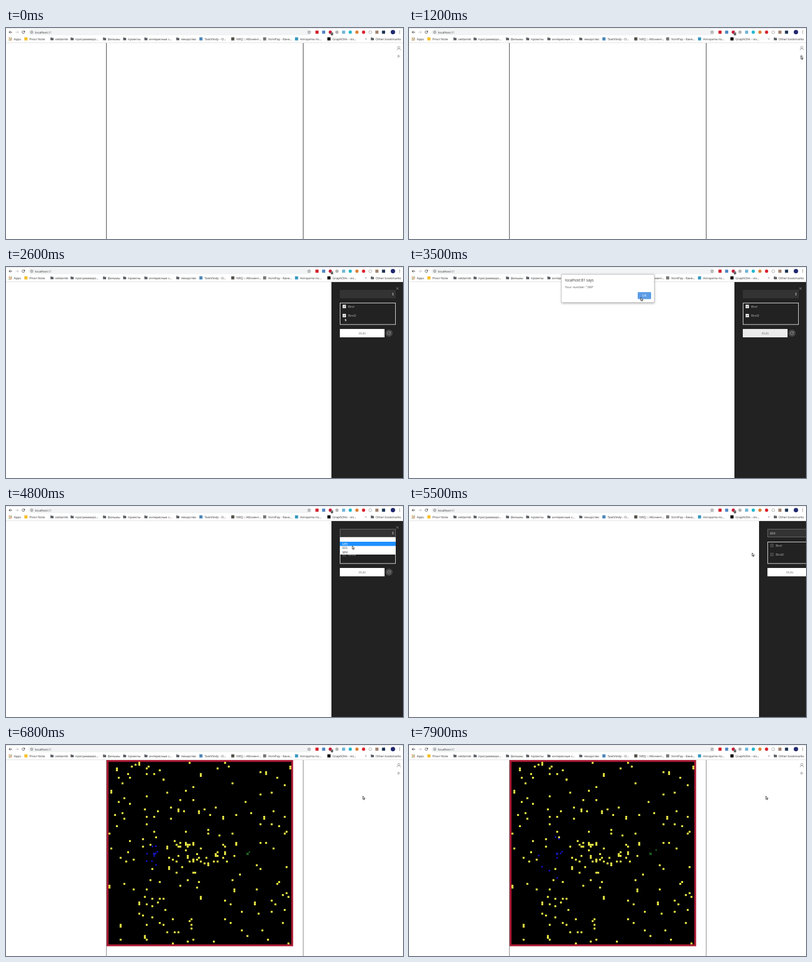
Write an HTML page with a canvas that moves like this. It is 710 px wide and 378 px high and loops after 8 s.

```html
<!DOCTYPE html>
<html lang="en">
<head>
<meta charset="utf-8">
<title>Browser game</title>
<style>
  html, body { margin: 0; width: 100%; height: 100%; overflow: hidden; background: #fff; }
  canvas { display: block; width: 710px; height: 378px; }
</style>
</head>
<body>
<canvas id="stage" width="710" height="378"></canvas>
<script>
const ctx = document.getElementById('stage').getContext('2d');
const UI = '"Open Sans", "Noto Sans", sans-serif';
const FORM = '"Liberation Sans", Arial, sans-serif';
const LOOP = 8000, STEP = 100;

// Moments at which the picture changes hard
const PANEL_OPENS = 1400, FIRST_CHECK = 2200, SECOND_CHECK = 2500, RUN_HOVER = 2700;
const ALERT_OPENS = 3000, ALERT_CLOSES = 4100, SELECT_FOCUS = 4600, LIST_OPENS = 4700;
const LIST_CLOSES = 4900, PANEL_CLOSES = 5443, GAME_STARTS = 5700;

// Timing helpers
const between = (t, from, to) => t >= from && t < to;
const portion = (t, from, to) => Math.min(1, Math.max(0, (t - from) / (to - from)));
const mix = (a, b, u) => a + (b - a) * u;
const easeOut = u => 1 - (1 - u) ** 2;
const smooth = u => u * u * (3 - 2 * u);

// Drawing helpers
function rect(x, y, w, h, color) {
  ctx.fillStyle = color;
  ctx.fillRect(x, y, w, h);
}
function roundRect(x, y, w, h, r, color) {
  ctx.fillStyle = color;
  ctx.beginPath();
  ctx.roundRect(x, y, w, h, r);
  ctx.fill();
}
function frame(x, y, w, h, color, width = 1) {
  ctx.strokeStyle = color;
  ctx.lineWidth = width;
  ctx.strokeRect(x, y, w, h);
}
function disc(x, y, r, color) {
  ctx.fillStyle = color;
  ctx.beginPath();
  ctx.arc(x, y, r, 0, 7);
  ctx.fill();
}
function arc(x, y, r, color, width = 0.8, from = 0, to = Math.PI * 2) {
  ctx.strokeStyle = color;
  ctx.lineWidth = width;
  ctx.beginPath();
  ctx.arc(x, y, r, from, to);
  ctx.stroke();
}
function shape(d, x, y, fill, stroke, width = 0.8) {
  const path = new Path2D(d);
  ctx.save();
  ctx.translate(x, y);
  if (fill) { ctx.fillStyle = fill; ctx.fill(path); }
  if (stroke) { ctx.strokeStyle = stroke; ctx.lineWidth = width; ctx.stroke(path); }
  ctx.restore();
}
function cross(x, y, color, width) {
  shape('M-2-2L2 2M2-2L-2 2', x, y, null, color, width);
}
function text(string, x, y, size, color, font = UI, align = 'left') {
  ctx.font = size + 'px ' + font;
  ctx.fillStyle = color;
  ctx.textAlign = align;
  ctx.fillText(string, x, y);
}

// Browser chrome; a bookmark without a colour is a folder
const bookmarks = [
  [42, 'Pinor Note', '#f5bf28'], [88, 'veldamik'], [124, 'программиро…'],
  [182, 'фильмы'], [218, 'проекты'], [256, 'интересные с…'], [313, 'лекарство'],
  [355, 'TaskVindy - O…', '#4a86b8'], [412, 'NRQ :: Абонент…', '#55524a'],
  [469, 'VornPay - банк…', '#777'], [526, 'Алгоритм по…', '#3698c0'],
  [584, 'GraphOlm - vis…', '#000'], [661, 'Other bookmarks']
];
const extensions = [
  'square #d3202c', 'square #5085c4', 'disc #c8213c', 'disc #b4b4b4', 'square #70b6d6',
  'disc #24b7cb', 'disc #dc8237', 'disc #d8232d', 'ring #999', 'square #a18372', 'square #1d3552'
];

function drawToolbar() {
  rect(0, 0, 710, 1, '#dfe1e5');
  roundRect(40, 2, 507, 11, 5.5, '#f1f3f4');
  shape('M3 0H-2.5M0-2.5L-2.5 0L0 2.5', 8, 7.5, null, '#444', 0.9);
  shape('M-3 0H2.5M0-2.5L2.5 0L0 2.5', 20, 7.5, null, '#c4c4c4', 0.9);
  arc(31, 7.5, 2.3, '#555', 0.9, 0.3, 5.6);
  shape('M3-3V0H0Z', 31, 7.5, '#555');
  arc(46, 7.5, 2.3, '#666', 0.7);
  shape('M0-1.8V-1M0-.5V1.5', 46, 7.5, null, '#666');
  text('localhost', 52, 9.5, 5.4, '#333');
  text(':81', 52 + ctx.measureText('localhost').width, 9.5, 5.4, '#888');
  shape('M0-2.8L.8-.8L2.8-.8L1.2.5L1.8 2.5L0 1.3L-1.8 2.5L-1.2.5L-2.8-.8L-.8-.8Z', 542, 7.5, null, '#555', 0.6);

  extensions.forEach((icon, i) => {
    const [kind, color] = icon.split(' ');
    const x = 556.2 + i * 11.9;
    if (kind === 'square') rect(x - 2.8, 4.7, 5.6, 5.6, color);
    else if (kind === 'disc') disc(x, 7.5, 2.9, color);
    else arc(x, 7.5, 2.6, color);
  });
  rect(581, 8, 4, 5, '#444');
  text('5', 583, 12, 4.5, '#fff', UI, 'center');
  disc(692, 7.3, 3.9, '#20286f');
  for (const dy of [-2.3, 0, 2.3]) disc(704, 7.5 + dy, 0.65, '#555');
}

function drawBookmarks() {
  const appColors = ['#d9503f', '#e0a72e', '#4b9b62'];
  for (let row = 0; row < 3; row++)
    for (let col = 0; col < 3; col++)
      rect(5 + col * 2, 17 + row * 2, 1.4, 1.4, appColors[(col + row) % 3]);
  text('Apps', 14, 21.6, 5.5, '#333');
  for (const [x, label, color] of bookmarks) {
    if (color) rect(x - 9.2, 16.7, 5.6, 5.6, color);
    else shape('M0 0H2.2L2.9.8H5.5V5H0Z', x - 8.5, 17, '#5f6368');
    text(label, x, 21.6, 5.5, '#333');
  }
  text('»', 643.5, 21.2, 6, '#444', UI, 'center');
  rect(0, 26, 710, 0.8, '#ddd');
}

// Game board: 100 by 100 cells, the outer ring is the wall
const CELL = 3.335, LEFT = 180, TOP = 27, SIZE = 100 * CELL;
const BLUE = { x: 265, y: 195 }, GREEN = { x: 432, y: 195 };
const blueEnds = [
  [262, 165], [268, 168], [232, 198], [238, 218], [251, 225], [265, 238], [265, 202], [271, 194], [274, 191]
];

// Even scatter with a denser patch in the middle; some food comes in pairs
function scatterFood() {
  let seed = 2024;
  const random = () => (seed = seed * 16807 % 2147483647) / 2147483647;
  const food = [];
  const add = (col, row) => {
    const x = LEFT + col * CELL, y = TOP + row * CELL;
    const free = base => Math.hypot(x - base.x, y - base.y) > 13;
    if (free(BLUE) && free(GREEN)) food.push({ x, y });
  };
  for (let i = 0; i < 210; i++) {
    const middle = i % 7 === 0;
    const col = Math.floor(middle ? 32 + random() * 38 : 1 + random() * 98);
    const row = Math.floor(middle ? 43 + random() * 14 : 1 + random() * 98);
    add(col, row);
    if (i % 10 === 0 && row < 98) add(col, row + 1);
  }
  return food;
}
const food = scatterFood();

function drawGame(t) {
  const progress = portion(t, 5800, 7900);
  const travel = (from, to) => to - Math.round((to - from) * (1 - progress) / CELL) * CELL;

  rect(LEFT, TOP, SIZE, SIZE, '#ab1a33');
  rect(LEFT + CELL, TOP + CELL, SIZE - 2 * CELL, SIZE - 2 * CELL, '#000');
  for (const { x, y } of food) {
    const eaten = Math.hypot(x - BLUE.x, y - BLUE.y) < 25 * progress;
    if (!eaten) rect(x, y, CELL, CELL, '#f6f548');
  }
  blueEnds.forEach(([x, y], i) => {
    const offset = i % 3 * 2;
    disc(travel(BLUE.x + offset, x), travel(BLUE.y + 1 - offset, y), 1.5, '#1414dc');
  });
  cross(BLUE.x, BLUE.y, '#2222e6', 1.2);
  disc(travel(GREEN.x - 3, 442), travel(GREEN.y, 188.5), 1.4, '#176b20');
  cross(GREEN.x, GREEN.y, '#238a2c', 1.2);
}

function drawHome(t) {
  const playing = t >= GAME_STARTS;
  for (const x of [179, 531]) rect(x, 27, 1, 351, playing ? '#888' : '#444');
  arc(702.5, 34.7, 1.9, '#777', 0.7);
  shape('M-3 3Q-3 0 0 0Q3 0 3 3', 702.5, 36.7, null, '#777', 0.7);
  shape('M-1.5-2L2 0L-1.5 2Z', 702.5, 50.5, null, '#777', 0.7);
  if (playing) drawGame(t);
}

// Side panel
function drawCheckbox(left, y, label, checked) {
  rect(left + 20, y - 3, 6, 6, checked ? '#f4f4f4' : '#3c3c3c');
  if (checked) shape('M-1.7 0L-.5 1.3L1.8-1.5', left + 23, y, null, '#333', 0.9);
  else frame(left + 20.3, y - 2.7, 5.4, 5.4, '#555', 0.6);
  text(label, left + 30, y + 2.4, 6.1, '#b0b0b0', FORM);
}
function drawPanel(t) {
  const opened = easeOut(portion(t, PANEL_OPENS, PANEL_OPENS + 300));
  const closed = easeOut(portion(t, PANEL_CLOSES, PANEL_CLOSES + 300));
  const left = 710 - 128 * (opened - closed);
  rect(left, 27, 128, 351, '#222');
  cross(left + 118, 38.5, '#aaa', 0.7);

  rect(left + 15, 41, 100, 15, '#333');
  if (t >= SELECT_FOCUS) frame(left + 15.5, 41.5, 99, 14, '#777', 0.8);
  shape('M-1.4-.7L0-2.5L1.4-.7ZM-1.4.7L0 2.5L1.4.7Z', left + 110, 48.5, '#ddd');
  if (t >= LIST_CLOSES) text('389', left + 19, 50.8, 6, '#bbb', FORM);

  frame(left + 15.5, 64.5, 99, 38.5, '#ddd');
  drawCheckbox(left, 70.7, 'Brol', between(t, FIRST_CHECK, ALERT_CLOSES));
  drawCheckbox(left, 87, 'Brol2', between(t, SECOND_CHECK, ALERT_CLOSES));

  rect(left + 15, 111, 80, 15, between(t, RUN_HOVER, ALERT_CLOSES) ? '#ebebeb' : '#fff');
  text('RUN', left + 55, 120.6, 5.5, '#777', FORM, 'center');
  disc(left + 103, 118.5, 6.5, '#444');
  arc(left + 103, 118.5, 2.8, '#999', 0.8, 0.2, 5.4);
  shape('M3-3V-.2H.3Z', left + 103, 118.5, '#999');

  if (between(t, LIST_OPENS, LIST_CLOSES)) {
    rect(left + 15, 56, 100, 31, '#fff');
    rect(left + 15, 64, 100, 7.6, '#1e90ff');
    ['185', '331', '389'].forEach((option, i) =>
      text(option, left + 19, 69.6 + i * 7.6, 6, i ? '#444' : '#fff', FORM));
  }
}

function drawAlert() {
  ctx.save();
  ctx.shadowColor = 'rgba(0,0,0,.35)';
  ctx.shadowBlur = 4;
  ctx.shadowOffsetY = 1;
  rect(272.5, 13, 166.5, 50.5, '#fff');
  ctx.restore();
  frame(272.5, 13.5, 166, 50, '#bbb', 0.7);
  text('localhost:81 says', 279, 26.2, 6.5, '#333');
  text('Your number: "389"', 279, 37.8, 5.6, '#555');
  roundRect(409, 45, 24, 12.5, 1.5, '#5c9ce6');
  text('OK', 421, 53.4, 5.5, '#fff', UI, 'center');
}

// Pointer moves: from time, to time, end point
const moves = [
  [400, 1200, 701, 50], [1700, 2200, 605, 70], [2200, 2500, 605, 86], [2500, 2800, 609, 108],
  [3100, 3500, 414.5, 54.5], [4100, 4500, 620, 47], [4600, 4900, 619, 80],
  [4900, 5300, 613.7, 84], [5500, 5800, 638.2, 91.5]
];
function drawPointer(t) {
  if (t < moves[0][0]) return;
  let x = 486, y = 60;
  for (const [from, to, endX, endY] of moves) {
    const u = smooth(portion(t, from, to));
    x = mix(x, endX, u);
    y = mix(y, endY, u);
  }
  shape('M0 0V5.8L1.3 4.6L2.2 6.7L3.1 6.3L2.2 4.2H4Z', x, y, '#fff', '#222', 0.8);
}

function draw(now) {
  const t = Math.floor(now % LOOP / STEP) * STEP;
  rect(0, 0, 710, 378, '#fff');
  drawToolbar();
  drawBookmarks();
  if (between(t, PANEL_OPENS, GAME_STARTS)) drawPanel(t);
  else drawHome(t);
  if (between(t, ALERT_OPENS, ALERT_CLOSES)) drawAlert();
  drawPointer(t);
}

const start = performance.now();
function tick() {
  draw(performance.now() - start);
  requestAnimationFrame(tick);
}
tick();
</script>
</body>
</html>
```
